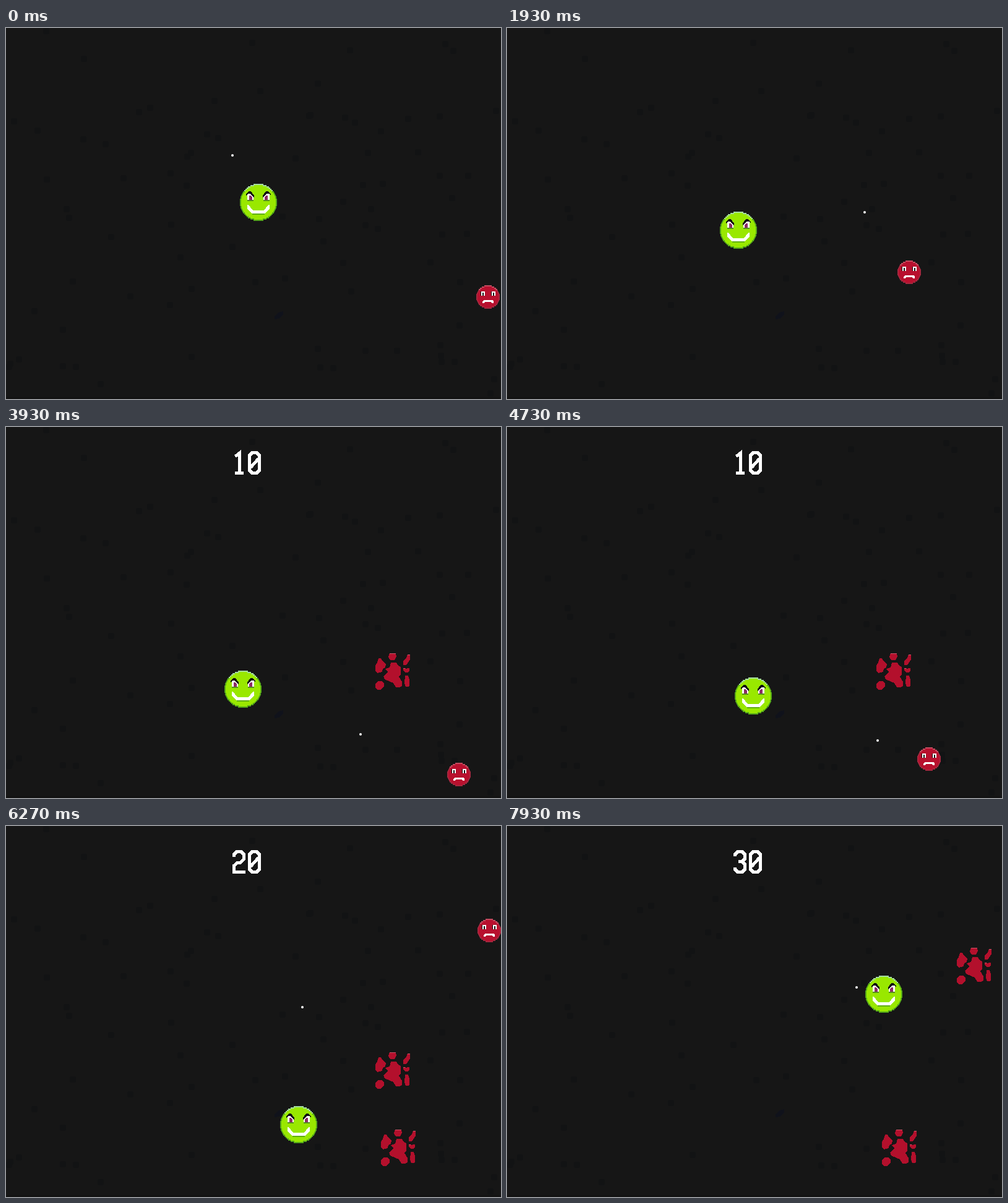
An HTML page that plays this animation: 800x600 px, repeating every 8 s.

```html
<!DOCTYPE html>
<html lang="en">
<head>
<meta charset="utf-8">
<title>Smiley chase</title>
<style>
html, body { margin: 0; width: 100%; height: 100%; overflow: hidden; background: #161616; }
svg { display: block; width: 100vw; height: 100vh; }
</style>
</head>
<body>
<svg id="stage" viewBox="0 0 800 600" shape-rendering="crispEdges">
  <defs>
    <g id="splat" fill="#b3102c">
      <path d="M23 0h10l1 5-3 6h-7l-3-5z"/>
      <path d="M5 8h4l3 5 5 5-1 5-4 2-1 5-8 2-3-4v-8l3-5z"/>
      <path d="M25 15h9l2 4 5 3v12l-3 4 5 8v7l-4 2h-6l-4-7-14-6-2-5 7-7-4-5 7-2z"/>
      <path d="M4 45h6l4 4v5l-6 5H3l-3-4v-6z"/>
      <path d="M52 2h4v8l-6 9h-5v-7l5-5z"/>
      <path d="M45 24h4l1 2 1-2h4v4l-2 3h-5l-3-3z"/>
      <path d="M48 36h5l2 7v9l-2 2h-4l-2-5z"/>
      <path d="M23 0h10v1H23zM52 2h4v1h-4zM45 24h3v1h-3z" fill="#cf5568"/>
    </g>
    <g id="angryEye">
      <path d="M-18-14h5l5 5v6h-10z" fill="#fff"/>
      <path d="M-20-13l4-5h4l5 7v3l-7-6h-3l-3 3z" fill="#111"/>
      <path d="M-15-11h3l2 3v4h-5z" fill="#8c2c68"/>
      <path d="M-18-4h10v2h-10z" fill="#568e20"/>
    </g>
    <g id="sadEye">
      <path d="M-11-9h6v7h-6z" fill="#fff"/>
      <path d="M-9-7h2v5h-2zM-12-9h1v7h-1z" fill="#111"/>
    </g>
  </defs>
  <rect width="800" height="600" fill="#161616"/>
  <rect y="597" width="800" height="3" fill="#121212"/>
  <g id="spots" fill="#121314"></g>
  <path d="M434 471v-5l6-6 8-2v5l-6 7z" fill="#10121b"/>
  <g id="player">
    <g id="playerBody"></g>
    <use href="#angryEye"/>
    <use href="#angryEye" transform="scale(-1 1)"/>
    <path d="M-18 4h2l7 9h18l7-9h2v6l-7 8h-22l-7-8z" fill="#fff"/>
    <path d="M-10 18h20v2h-20z" fill="#5fae08"/>
  </g>
  <g id="foes"></g>
  <g id="splats"></g>
  <g id="score" role="img" fill="none" stroke="#fff" stroke-width="5"></g>
  <circle id="dot" r="2" fill="#fff" shape-rendering="auto"/>
</svg>
<script>
const LOOP = 8000, STEP = 1000 / 15, STAIN_LIFE = 4000;
const $ = id => document.getElementById(id);
const add = (parent, html) => {
  parent.insertAdjacentHTML("beforeend", html);
  return parent.lastElementChild;
};

// Faint specks on the floor.
let seed = 7;
const random = () => (seed = seed * 16807 % 2147483647) / 2147483647;
for (let i = 0; i < 85; i++) {
  add($("spots"), `<rect x="${Math.floor(random() * 790)}" y="${Math.floor(random() * 590)}" width="10" height="10" rx="3"/>`);
}

// Disc built from 2px rows, with a lit rim on top and a darker one elsewhere.
function disc(r, fill, lit, shade) {
  const row = (y, w, color) => `<rect x="${-w}" y="${y}" width="${2 * w}" height="2" fill="${color}"/>`;
  const half = (y, radius) => Math.round(Math.sqrt(Math.max(0, radius * radius - (y + 1) ** 2)));
  let out = "";
  for (let y = -r; y < r; y += 2) {
    out += row(y, half(y, r), y < -0.6 * r ? lit : shade) + row(y, half(y, r - 2), fill);
  }
  return out;
}

$("playerBody").innerHTML = disc(30, "#99e800", "#a5dca0", "#55a818");
const sadFace = disc(19, "#b8102e", "#c44c60", "#a5283f") +
  '<use href="#sadEye"/><use href="#sadEye" x="17"/>' +
  '<path d="M-7 5h14l2 2v3h-3l-1-2h-10l-1 2h-3v-3z" fill="#fff"/>';

const digits = [
  "M7 2.5H14L18.5 7V31L14 35.5H7L2.5 31V7ZM4 27L17 12",
  "M4.5 8.5L11.5 3V35.5M4 35.5H18",
  "M2.5 11V7L7 2.5H14L18.5 7V14L13 20H8L2.5 25V35.5H21",
  "M2.5 10V7L7 2.5H14L18.5 7V14L14 18.5H8M14 18.5L18.5 23V31L14 35.5H7L2.5 31V28"
];

// Tracks are a few [ms, x, y] points joined by a smooth curve.
const playerTrack = [
  [0, 408, 282], [870, 326, 304], [1400, 275, 344], [1930, 374, 327], [2480, 573, 372],
  [2870, 579, 424], [3930, 383, 424], [4330, 362, 437], [5530, 501, 436], [5750, 580, 486],
  [6400, 466, 470], [6930, 630, 337], [7150, 710, 243], [7930, 609, 272], [8000, 598, 275]
];
const dotTrack = [
  [0, 366, 206], [870, 310, 213], [1300, 430, 534], [1930, 578, 298], [2870, 461, 258],
  [3530, 470, 60], [3930, 573, 497], [4600, 620, 520], [5530, 408, 377], [6930, 570, 240],
  [7700, 565, 261]
];
// Each foe is caught at the last point of its track.
const foes = [
  [[0, 779, 435], [2480, 613, 384]],
  [[2500, 820, 613], [3930, 732, 562], [5690, 622, 509]],
  [[5200, 829, 112], [7130, 743, 215]]
].map(track => {
  const [die, x, y] = track[track.length - 1];
  return {
    track, die, born: track[0][0],
    face: add($("foes"), `<g>${sadFace}</g>`),
    stain: add($("splats"), `<use href="#splat" x="${x - 16}" y="${y - 18}"/>`)
  };
});

function at(track, t) {
  const last = track.length - 1;
  let i = 0;
  while (i < last - 1 && t >= track[i + 1][0]) i++;
  const a = track[i], b = track[i + 1], span = b[0] - a[0];
  const u = Math.min(1, Math.max(0, (t - a[0]) / span));
  const slope = (k, axis) => {
    const p = track[Math.max(0, k - 1)], n = track[Math.min(last, k + 1)];
    return (n[axis] - p[axis]) / (n[0] - p[0]) * span;
  };
  return [1, 2].map(axis => Math.round(
    a[axis] * (1 + 2 * u) * (1 - u) ** 2 + slope(i, axis) * u * (1 - u) ** 2 +
    b[axis] * u * u * (3 - 2 * u) + slope(i + 1, axis) * u * u * (u - 1)));
}

const place = (el, [x, y]) => el.setAttribute("transform", `translate(${x} ${y})`);
const show = (el, on) => el.setAttribute("visibility", on ? "visible" : "hidden");

function showScore(kills) {
  const text = kills ? String(kills * 10) : "";
  $("score").setAttribute("aria-label", text);
  $("score").innerHTML = [...text].map((c, i) =>
    `<path transform="translate(${366 + 25 * i} 39)" d="${digits[c]}"/>`).join("");
}

function draw(ms) {
  // The game runs at 15 poses a second, timed to 10 ms.
  const t = Math.round(Math.floor((ms % LOOP + 4) / STEP) * STEP / 10) * 10 % LOOP;
  place($("player"), at(playerTrack, t));
  place($("dot"), at(dotTrack, t));
  for (const foe of foes) {
    place(foe.face, at(foe.track, t));
    show(foe.face, t >= foe.born && t < foe.die);
    show(foe.stain, t >= foe.die && t < foe.die + STAIN_LIFE);
  }
  showScore(foes.filter(foe => t >= foe.die).length);
}

const start = performance.now();
function tick() {
  draw(performance.now() - start);
  requestAnimationFrame(tick);
}
tick();
</script>
</body>
</html>
```
